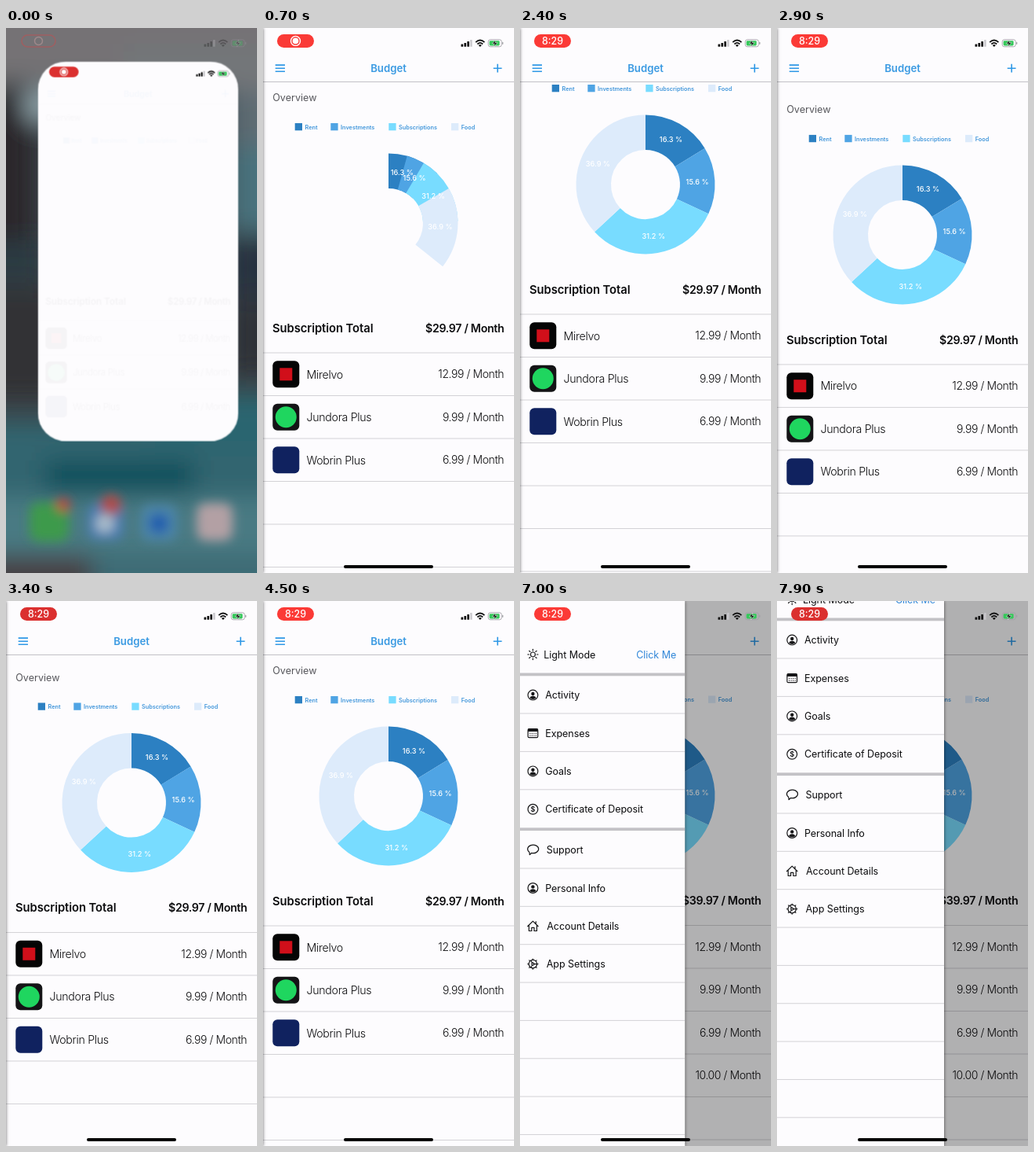
An HTML page that plays this animation: 320 px wide and 693 px high, repeating every 8 s.

```html
<!DOCTYPE html>
<html lang="en">
<head>
<meta charset="utf-8">
<title>Budget</title>
<style>
@property --p { syntax: '<number>'; inherits: true; initial-value: 1; }

html, body { margin: 0; width: 100%; height: 100%; overflow: hidden; background: #3c4045; }
svg { position: absolute; left: 0; top: 0; display: block; }
text { font-family: Inter, Roboto, sans-serif; fill: #0c0c0e; }
#stage, #app, #page { position: absolute; left: 0; top: 0; width: 320px; height: 693px; overflow: hidden; }

/* every animation shares one clock */
#app, #page, #scroll, #pie, #dim, #drawer, #menu, #pill, .rec, .clock, .before, .after {
  animation: 8s linear infinite;
}
#app { background: #fdfcfe; transform-origin: 0 0; animation-name: open; }
#page { animation-name: appear; }
#scroll { animation-name: scroll; }
#pie { animation-name: sweep; }
#dim { position: absolute; inset: 0; background: #000; opacity: 0; animation-name: dim; }
#drawer {
  position: absolute; left: 0; top: 0; width: 213px; height: 693px; background: #fdfcfe;
  box-shadow: 0 0 4px rgba(0,0,0,.6); transform: translateX(-213px); animation-name: slide;
}
#menu { animation-name: menu; }
#pill { fill: #fb3a36; animation-name: pulse; }
.rec { animation-name: recOut; }
.clock { animation-name: clockIn; }
.before { animation-name: leave; animation-timing-function: step-end; }
.after { animation-name: enter; animation-timing-function: step-end; }

.slice {
  fill: none; stroke-width: 44.5;
  stroke-dasharray: calc(var(--s) * var(--p) * 1px) 400px;
  transform: rotate(calc(var(--a) * var(--p) * var(--p) * 1deg - 90deg));
}
.value {
  --t: calc((var(--a) * var(--p) + var(--s) / 2) * var(--p) * 1deg);
  transform: rotate(var(--t)) translateY(-66.2px) rotate(calc(-1 * var(--t)));
  font-size: 9.2px; font-weight: 500; fill: #fff; text-anchor: middle;
}
.line { stroke: #d3d2d6; stroke-width: 1; }
.row { font-size: 14.2px; font-weight: 300; letter-spacing: -.3px; }
.price { font-size: 14px; font-weight: 300; letter-spacing: -.42px; text-anchor: end; }
.head { font-size: 14.8px; font-weight: 600; letter-spacing: -.08px; }
.sum { font-size: 14.2px; font-weight: 600; letter-spacing: -.3px; text-anchor: end; }
.key { font-size: 7.3px; font-weight: 600; fill: #4297db; }
.item { font-size: 12.5px; letter-spacing: -.05px; }
.ink { fill: none; stroke: #161618; stroke-width: 1.2; stroke-linecap: round; stroke-linejoin: round; }
.solid { fill: #161618; stroke: none; }
.tint { fill: none; stroke: #2f98e6; stroke-width: 1.6; }

@keyframes open {
  0% { transform: translate(41px, 43px) scale(.797); clip-path: inset(0 0 89.5px 0 round 45px);
       animation-timing-function: cubic-bezier(.2,.75,.3,1); }
  5%, 100% { transform: none; clip-path: inset(0 0 0 0 round 0); }
}
@keyframes appear { 0% { opacity: .03; } 4%, 100% { opacity: 1; } }
@keyframes sweep {
  0% { --p: 0; animation-timing-function: cubic-bezier(.37,0,.63,1); }
  17.2%, 100% { --p: 1; }
}
@keyframes scroll {
  0%, 23% { transform: translateY(0); animation-timing-function: ease-in; }
  26% { transform: translateY(-25px); animation-timing-function: ease-out; }
  30% { transform: translateY(-49px); animation-timing-function: ease-in; }
  33% { transform: translateY(-34px); }
  36% { transform: translateY(12px); animation-timing-function: ease-out; }
  38% { transform: translateY(26px); animation-timing-function: ease-in-out; }
  42.5% { transform: translateY(8.5px); animation-timing-function: ease-out; }
  46.25% { transform: translateY(4px); }
  52% { transform: translateY(.8px); }
  56%, 57% { transform: translateY(0); animation-timing-function: ease-in-out; }
  62% { transform: translateY(-24px); animation-timing-function: ease-in-out; }
  68%, 100% { transform: translateY(-.5px); }
}
@keyframes leave { 0% { opacity: 1; } 62.5%, 100% { opacity: 0; } }
@keyframes enter { 0% { opacity: 0; } 62.5%, 100% { opacity: 1; } }
@keyframes slide {
  0%, 82% { transform: translateX(-213px); animation-timing-function: ease-in-out; }
  88%, 100% { transform: none; }
}
@keyframes dim {
  0%, 82% { opacity: 0; animation-timing-function: ease-in-out; }
  88%, 100% { opacity: .3; }
}
@keyframes menu {
  0%, 91.5% { transform: translateY(70px); animation-timing-function: cubic-bezier(.4,.1,.4,1); }
  98.5%, 100% { transform: none; }
}
@keyframes pulse {
  9%, 20%, 37%, 48%, 65%, 76%, 93% { fill: #fb3a36; }
  0%, 14.4%, 42.5%, 70.6%, 98.7%, 100% { fill: #db302f; }
}
@keyframes recOut { 0%, 12% { opacity: 1; } 15%, 100% { opacity: 0; } }
@keyframes clockIn { 0%, 12% { opacity: 0; } 15%, 100% { opacity: 1; } }
</style>
</head>
<body>
<div id="stage"></div>
<script>
const svg = body => `<svg width="320" height="693" viewBox="0 0 320 693">${body}</svg>`;
const text = (x, y, cls, s, extra = '') => `<text x="${x}" y="${y}" class="${cls}" ${extra}>${s}</text>`;
const rect = (x, y, w, h, fill, r = 0) => `<rect x="${x}" y="${y}" width="${w}" height="${h}" rx="${r}" fill="${fill}"/>`;
const disc = (x, y, r, fill) => `<circle cx="${x}" cy="${y}" r="${r}" fill="${fill}"/>`;
const line = (y, w = 320) => `<path class="line" d="M0 ${y}H${w}"/>`;
const lines = (y, step, n, w) => Array.from({ length: n }, (_, i) => line(y + i * step, w)).join('');

// Blurred home screen
const wall = svg(`
  <defs><filter id="soft" x="-20%" y="-20%" width="140%" height="140%"><feGaussianBlur stdDeviation="15"/></filter>
  <filter id="icon" x="-50%" y="-50%" width="200%" height="200%"><feGaussianBlur stdDeviation="7"/></filter></defs>
  ${rect(0, 0, 320, 693, '#3b4449')}
  <g filter="url(#soft)">
    ${rect(-60, -60, 440, 130, '#757274')}${rect(150, 20, 240, 60, '#737679')}
    ${rect(-60, 80, 95, 210, '#29282c')}${disc(46, 98, 24, '#8fa3a9')}
    ${rect(-60, 270, 110, 55, '#2c3a42')}${rect(-60, 330, 130, 140, '#303135')}
    ${rect(285, 80, 100, 80, '#5d6c73')}${rect(285, 150, 100, 110, '#4a727d')}
    ${rect(285, 270, 100, 70, '#28303f')}${rect(285, 345, 100, 95, '#2e3338')}
    ${rect(-60, 500, 440, 100, '#316570')}${rect(50, 550, 190, 42, '#104f5c')}
    ${rect(180, 465, 200, 70, '#2a6570')}
    ${rect(-60, 596, 440, 74, '#4a7a83')}${rect(-60, 672, 170, 80, '#463f43')}
    ${rect(110, 668, 280, 80, '#3c6a74')}
  </g>
  <g filter="url(#icon)">
    ${rect(30, 603, 50, 50, '#3c9a4c', 12)}${disc(73, 606, 9, '#c0453c')}
    ${rect(104, 605, 46, 46, '#4b7db0', 12)}${disc(126, 630, 12, '#a9bccb')}${disc(134, 606, 13, '#b04c48')}
    ${rect(172, 606, 46, 46, '#4b85a8', 12)}${disc(195, 630, 13, '#245fae')}
    ${rect(243, 604, 46, 48, '#b3a0a4', 12)}
  </g>
  <g opacity=".3"><rect x="20" y="9" width="43" height="15" rx="7.5" fill="none" stroke="#f33" stroke-width="1.5"/>
    <circle cx="41.5" cy="16.5" r="5" fill="none" stroke="#fbb" stroke-width="1.5"/><use href="#signals"/></g>`);

// Donut chart
let from = 0;
const slices = [[58.7, '#2c80c2', '16.3 %'], [56.2, '#4fa4e4', '15.6 %'], [112.3, '#78dcff', '31.2 %'], [132.8, '#ddebfb', '36.9 %']]
  .map(([size, color, label]) => {
    const vars = `--a:${from};--s:${size}`;
    from += size;
    return { color, vars, label };
  });
const pie = `<g transform="translate(160 248)"><g id="pie">
  ${slices.map(s => `<circle class="slice" r="66.25" pathLength="360" stroke="${s.color}" style="${s.vars}"/>`).join('')}
  ${slices.map(s => text(0, 3.2, 'value', s.label, `style="${s.vars}"`)).join('')}</g></g>`;
const legend = [[40.7, 'Rent'], [86.3, 'Investments'], [160.3, 'Subscriptions'], [240, 'Food']]
  .map(([x, name], i) => rect(x, 121, 9.3, 9.3, slices[i].color) + text(x + 12.8, 128.6, 'key', name)).join('');

// Subscription rows
const row = (i, name, price, icon) => `<g transform="translate(0 ${(413 + i * 54.5)})">${icon}
  ${text(55.5, 32.5, 'row', name)}${text(307, 32.4, 'price', price + ' / Month')}</g>`;
const tile = fill => rect(12.3, 10.3, 34, 34, fill, 6);
const rows = row(0, 'Mirelvo', '12.99', tile('#050505') + rect(21.3, 19.3, 16, 16, '#d10f1a'))
  + row(1, 'Jundora Plus', '9.99', tile('#141416') + disc(29.3, 27.3, 13.5, '#1fd65f'))
  + row(2, 'Wobrin Plus', '6.99', tile('#10225f'))
  + `<g class="after">${row(3, 'Kelmor', '10.00', disc(30.3, 27.3, 13, '#2f98e6'))}</g>`;

const page = svg(`
  <clipPath id="below"><rect y="69" width="320" height="624"/></clipPath>
  <g clip-path="url(#below)"><g id="scroll">
    ${text(12.2, 93.2, '', 'Overview', 'font-size="12.6" style="fill:#56565b"')}
    ${legend}${pie}
    ${text(12, 386.9, 'head', 'Subscription Total')}
    ${text(307.5, 386.7, 'sum before', '$29.97 / Month')}${text(307.5, 386.7, 'sum after', '$39.97 / Month')}
    ${lines(413, 54.5, 8)}${rows}
  </g></g>
  <path d="M0 68.5H320" stroke="#c2c1c6"/>
  <path class="tint" d="M15.7 47.1H28M15.7 51.2H28M15.7 55.3H28M293.7 51.2H304.5M299.1 45.8V56.6"/>
  ${text(160, 55.8, '', 'Budget', 'font-size="13.2" font-weight="600" text-anchor="middle" style="fill:#3a9ae2"')}`);

// Side menu
const person = `<circle class="ink" r="6.4"/><circle class="solid" cy="-1.6" r="2.2"/><path class="solid" d="M-4 4Q-3.4 1.2 0 1.2T4 4Q0 6.6-4 4Z"/>`;
const spokes = (n, a, b) => Array.from({ length: n }, (_, i) => {
  const c = Math.cos(i * 2 * Math.PI / n), s = Math.sin(i * 2 * Math.PI / n);
  return `M${(a * c).toFixed(2)} ${(a * s).toFixed(2)}L${(b * c).toFixed(2)} ${(b * s).toFixed(2)}`;
}).join('');
const icons = {
  person,
  sun: `<circle class="ink" r="3"/><path class="ink" d="${spokes(8, 5, 6.6)}"/>`,
  calendar: `<rect class="ink" x="-6.3" y="-5.3" width="12.6" height="11" rx="1.5"/><path class="solid" d="M-6.3-5.3H6.3V-2H-6.3Z"/>
    <path class="ink" stroke-dasharray=".1 2.4" d="M-3.6 .6H4M-3.6 3.2H4"/>`,
  dollar: `<circle class="ink" r="6.4"/><text y="3.3" font-size="9" font-weight="600" text-anchor="middle">$</text>`,
  bubble: `<path class="ink" d="M-4.2 6.2Q-2.4 5.6-2 4A7 5.3 0 1 0-4.6 2.8Q-4 4.6-4.2 6.2Z"/>`,
  house: `<path class="ink" d="M-6.8 .4L0-6.2L6.8 .4M3.8-2.6V-5.6M-5-1.2V6.2H-1.6V2H1.6V6.2H5V-1.2"/>`,
  gear: `<circle class="ink" r="5.2"/><path class="ink" stroke-width="1.8" d="${spokes(8, 5.6, 6.6)}"/>
    <path class="ink" d="${spokes(3, 1.4, 5)}"/><circle class="ink" r="1.5"/>`
};
const item = (y, icon, name, x = 35) =>
  `<g transform="translate(19.2 ${y})">${icons[icon]}</g>${text(x, y + 4.5, 'item', name)}`;
const menu = svg(`
  <clipPath id="panel"><rect width="213" height="693"/></clipPath>
  <g clip-path="url(#panel)"><g id="menu">
    ${item(-2, 'sun', 'Light Mode', 33)}
    ${text(151, 2.5, 'item', 'Click Me', 'style="fill:#2f86d8"')}
    ${rect(0, 21.5, 213, 3.8, '#c3c2c6')}
    ${item(49.6, 'person', 'Activity')}${item(98, 'calendar', 'Expenses')}
    ${item(146.4, 'person', 'Goals')}${item(194.8, 'dollar', 'Certificate of Deposit')}
    ${lines(73, 48.4, 3, 213)}
    ${rect(0, 218.3, 213, 3.8, '#c3c2c6')}
    ${item(246.4, 'bubble', 'Support', 36.5)}${item(295, 'person', 'Personal Info')}
    ${item(343.3, 'house', 'Account Details', 37)}${item(391.6, 'gear', 'App Settings', 36.5)}
    ${lines(270, 48.35, 9, 213)}
  </g></g>`);

const status = svg(`
  <rect id="pill" x="18" y="8" width="47" height="17" rx="8.5"/>
  <g class="rec"><circle cx="41.5" cy="16.4" r="6" fill="none" stroke="#fff" stroke-width="1.4"/>${disc(41.5, 16.4, 3.8, '#fff')}</g>
  ${text(41.5, 20.9, 'clock', '8:29', 'font-size="12.4" font-weight="500" text-anchor="middle" style="fill:#fff"')}
  <g id="signals">
    ${rect(252.5, 20.4, 2.7, 3.4, '#111', .6)}${rect(256.4, 18.9, 2.7, 4.9, '#111', .6)}
    ${rect(260.3, 17, 2.7, 6.8, '#111', .6)}${rect(264.1, 15, 2.5, 8.8, '#c8c7cb', .6)}
    <path d="M271.2 18.2Q276.8 12.8 282.4 18.2M273.4 20.5Q276.8 17.3 280.2 20.5" fill="none" stroke="#111" stroke-width="1.8"/>
    <path d="M274.8 21.9Q276.8 20.2 278.8 21.9L276.8 24Z" fill="#111"/>
    <rect x="287.2" y="14.8" width="17" height="9" rx="2.6" fill="none" stroke="#a3a2a7" stroke-width=".9"/>
    ${rect(288.6, 16.2, 13, 6.2, '#35c85a', 1.4)}${rect(305, 17.8, 1.3, 3, '#a3a2a7', .6)}
    <path d="M296.6 15L292.2 20H295.2L294.4 23.8L299 18.6H295.9Z" fill="#111" stroke="#fff" stroke-width=".5"/>
  </g>
  ${rect(103, 683, 114, 4, '#050505', 2)}`);

document.getElementById('stage').innerHTML = `${wall}
  <div id="app"><div id="page">${page}<div id="dim"></div><div id="drawer">${menu}</div></div>${status}</div>`;
</script>
</body>
</html>
```
